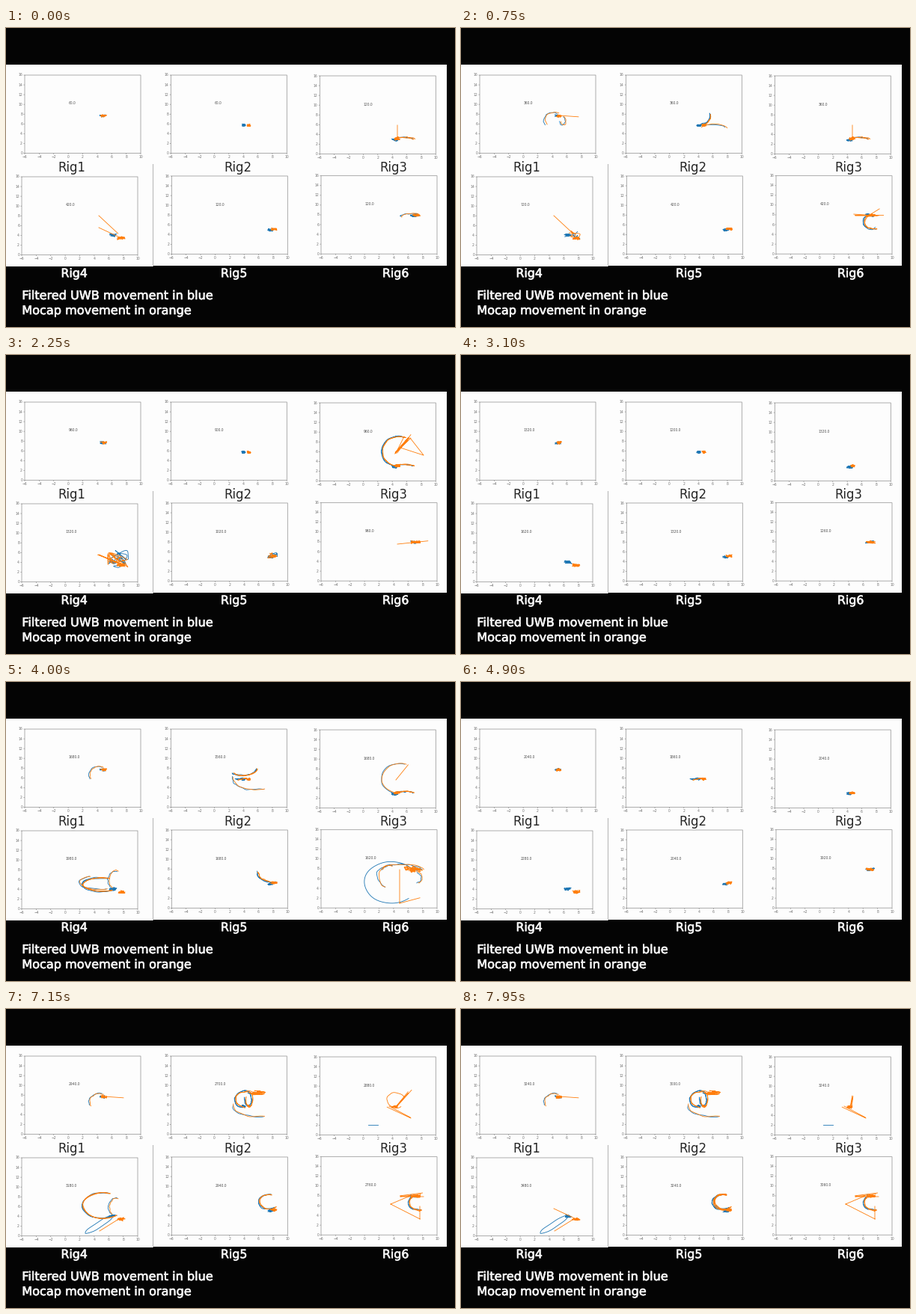
Recreate the animation shown at these times as a matplotlib script. Size 600 px wide and 400 px high, loop 8 s.

```python
import numpy as np
import matplotlib.pyplot as plt
from matplotlib import patheffects
from matplotlib.animation import FuncAnimation
from matplotlib.collections import LineCollection
from matplotlib.patches import Rectangle

W, H, DPI = 600, 400, 100
PX = 72 / DPI
STEP, FRAMES = 50, 160
COLORS = {"b": "#1f77b4", "o": "#ff7f0e"}
BOX_W, BOX_H = 155, 104.5
TICK = 60
rng = np.random.default_rng(7)

# Corner of each plot, clock at the start and clock units per ms
RIGS = [(25, 63, 80, 0.4), (220.3, 63, 90, 0.37), (419.3, 64, 120, 0.394),
        (21, 199, 460, 0.383), (221.3, 198, 140, 0.394), (421, 197.7, 160, 0.3655)]
# Times (ms) at which the rigs are in the middle of an activity
STAGES = [0, 750, 2250, 4000, 5900, 7150, 7950]

trails = [{"b": [], "o": []} for _ in RIGS]
homes = [{"b": [], "o": []} for _ in RIGS]


def life(first, last):
    """Times at which a trail starts to grow and is fully wiped."""
    start, end = -1e6, 1e6
    if first > 0:
        start = STAGES[first] - min(750, 0.65 * (STAGES[first] - STAGES[first - 1])) - 60 * rng.random()
    if last < 6:
        end = STAGES[last] + min(750, 0.65 * (STAGES[last + 1] - STAGES[last])) + 60 * rng.random()
    return start, end


def home(rig, span, x, y, dx=2, dy=0, sx=2.4, sy=1, colors="bo"):
    """Restless walk around the resting place, blue and orange dx, dy apart."""
    for c in colors:
        side = -1 if c == "b" else 1
        p = np.clip(rng.normal(0, 1, (400, 2)), -1.7, 1.7) * (sx, sy)
        homes[rig][c].append((p + (x + side * dx, y + side * dy), life(*span)))


def swing(rig, span, x, y, rx, ry, a0, a1, n=1, tilt=0, colors="bo"):
    """Arc of an ellipse, walked n times with small deviations."""
    u = np.linspace(0, 1, 60)
    a, r = np.radians(a0 + (a1 - a0) * u), np.radians(tilt)
    for c in colors:
        shift = -1.5 if c == "b" and len(colors) > 1 else 0
        for _ in range(n):
            ex, ey = rx * np.cos(a), ry * np.sin(a)
            p = np.column_stack([x + shift + ex * np.cos(r) - ey * np.sin(r),
                                 y + ex * np.sin(r) + ey * np.cos(r)])
            for k in (2, 5, 11):
                wave = np.sin(k * 3 * u[:, None] + rng.uniform(0, 6.3, 2))
                p += wave * rng.normal(0, 1.3 / k**0.5, 2) * 0.6
            trails[rig][c].append((p, life(*span)))


def spike(rig, span, x, y, length, angle, n=1, colors="o"):
    """Straight jumps from a point, fanned out when there are several."""
    u = np.linspace(0, 1, 20)[:, None]
    for c in colors:
        for i in range(n):
            jx, jy, ja, jl = rng.normal(0, 1, 4) * (i > 0)
            a, far = np.radians(angle + 6 * ja), length * (1 + 0.1 * jl)
            p = np.array([x + jx, y + jy]) + u * far * np.array([np.cos(a), np.sin(a)])
            trails[rig][c].append((p, life(*span)))


def scribble(rig, span, x, y, sx, sy, n=9, colors="bo"):
    """Smooth wandering around a point."""
    u = np.linspace(0, n - 1, 8 * n)
    for c in colors:
        knots = np.clip(rng.normal(0, 0.7, (n, 2)), -1, 1) * (sx, sy) + (x, y)
        p = np.column_stack([np.interp(u, np.arange(n), k) for k in knots.T])
        soft = np.array([np.convolve(k, np.ones(5) / 5, "valid") for k in p.T]).T
        trails[rig][c].append((soft, life(*span)))


ALWAYS = (0, 6)

# Rig1: hooks to the left of its home
home(0, ALWAYS, 130, 117.5, 0.5)
for span in ((1, 1), (3, 3), (5, 6)):
    swing(0, span, 124, 124, 12, 11, 150, 300)
for span in ((1, 1), (5, 6)):
    spike(0, span, 131, 117, 26, 4)
swing(0, (1, 1), 137, 124, 3.5, 6, -70, 170)
scribble(0, (4, 4), 134, 113, 11, 9, 16)

# Rig2: low sweep to the right, later a round trip above
home(1, ALWAYS, 321, 130, 3.5, sx=1.6)
swing(1, (1, 1), 322, 117, 12, 12, 90, -10, 2)
swing(1, (1, 1), 338, 134, 18, 5, 200, 350)
for span in ((3, 3), (4, 4), (5, 6)):
    swing(1, span, 335, 130, 31, 14, 190, 70)
swing(1, (3, 3), 318, 116, 18, 9, 140, 0, 2)
scribble(1, (3, 4), 317, 130, 11, 2)
swing(1, (5, 6), 321, 121, 14, 11, 100, 310, 2)
swing(1, (5, 6), 325, 121, 5, 9, -90, 200, 2)
scribble(1, (5, 6), 339, 112, 12, 3, 24, "o")

# Rig3: wide arc to the upper left
home(2, (0, 4), 521, 149, 1.5, -0.7)
home(2, (5, 6), 519, 131, 0, colors="o")
for span in ((0, 1), (2, 2), (3, 3), (4, 4)):
    swing(2, span, 533, 149, 13, 2.5, 180, 340, 2)
spike(2, (0, 1), 523, 148, 18, -90)
for stage, count in ((2, 2), (3, 1)):
    swing(2, (stage, stage), 526, 129, 23, 20, 290, 90, count)
    spike(2, (stage, stage), 521, 131, 26, -51, count**3)
spike(2, (2, 2), 527, 124, 32, 18)
spike(2, (2, 2), 558, 134, 29, 232)
swing(2, (4, 4), 502, 151, 12, 10, 160, 0, colors="b")
spike(2, (4, 4), 522, 132, 14, -82, 3)
spike(2, (4, 4), 507, 130, 18, 3, 2)
scribble(2, (4, 4), 527, 148, 14, 6, 14, "o")
spike(2, (5, 6), 484, 155, 13, 0, colors="b")
spike(2, (5, 6), 512, 130, 32, 28)
spike(2, (5, 6), 541, 146, 35, 205)
swing(2, (5, 5), 521, 122, 12, 10, 60, 330, colors="o")
spike(2, (5, 5), 520, 132, 26, -48, 3)
spike(2, (6, 6), 520, 132, 16, -80, 3)

# Rig4: long loops to the left
home(3, ALWAYS, 148.5, 279, 5.5, 2, 3, 1.3)
spike(3, (0, 1), 124, 251, 35, 43)
for stage, count in ((0, 1), (2, 3), (6, 1)):
    spike(3, (stage, stage), 124, 267, 33, 25, count)
scribble(3, (1, 1), 148, 277, 12, 6)
scribble(3, (2, 2), 150, 272, 14, 13, 20)
swing(3, (3, 3), 129, 271, 26, 9, 290, 60, 2)
swing(3, (3, 3), 126, 268, 27, 9, 240, 70)
for span in ((3, 3), (4, 4), (5, 5)):
    swing(3, span, 147, 265, 9, 12, 290, 120)
spike(3, (4, 4), 117, 278, 34, 3, colors="bo")
swing(3, (5, 5), 130, 263, 27, 17, 290, 50, 2)
swing(3, (5, 6), 125, 288, 22, 4, 0, 360, tilt=-31, colors="b")
spike(3, (5, 6), 125, 297, 30, -32)

# Rig5: mostly resting, then a C-shaped walk
home(4, ALWAYS, 356, 269.5, 2, -0.7)
scribble(4, (2, 2), 356, 268, 7, 4)
swing(4, (3, 3), 358, 254, 21, 14, 180, 80, 2)
scribble(4, (4, 4), 355, 267, 11, 5, 12)
swing(4, (5, 6), 352, 258, 13, 9.5, 285, 50, 2)
swing(4, (6, 6), 351, 258, 14, 10, 285, 50, 2)

# Rig6: band at home, once a very wide loop
home(5, ALWAYS, 547, 250.5, 0.5, sx=3.6)
swing(5, (0, 0), 542, 253, 13, 5, 180, 340)
for span in ((1, 1), (5, 6)):
    swing(5, span, 553, 259, 14, 10, 220, 80, 2)
    spike(5, span, 527, 251, 31, 0, 3)
spike(5, (1, 1), 543, 252, 19, -32)
spike(5, (2, 2), 523, 253, 41, -6)
swing(5, (3, 3), 515, 268, 37, 28, 320, 50, colors="b")
swing(5, (3, 3), 512, 260, 14, 15, 290, 110)
swing(5, (3, 3), 530, 252, 28, 8, 190, 350)
swing(5, (3, 3), 546, 262, 10, 8, -60, 60)
scribble(5, (3, 3), 546, 250, 15, 5, 20, "o")
spike(5, (3, 3), 526, 251, 45, 90)
spike(5, (3, 3), 526, 296, 28, -15)
swing(5, (4, 4), 519, 282, 44, 35, 180, 315, 2, colors="b")
spike(5, (4, 4), 525, 246, 35, 12, 5)
spike(5, (4, 4), 525, 262, 20, -50, 3)
spike(5, (5, 6), 514, 261, 28, -23)
spike(5, (5, 6), 514, 261, 44, 27)
spike(5, (5, 6), 553, 281, 17, -90)


fig = plt.figure(figsize=(W / DPI, H / DPI), dpi=DPI, facecolor="#040404")
ax = fig.add_axes([0, 0, 1, 1])
ax.set_xlim(0, W)
ax.set_ylim(H, 0)
ax.axis("off")


def label(x, y, s, size, color, ha="left", va="center"):
    return ax.text(x, y, s, fontsize=size * PX, color=color, ha=ha, va=va,
                   family="DejaVu Sans", zorder=4)


ax.add_patch(Rectangle((0, 49), 589, 269, fc="#fdfdfd", lw=0))
ax.add_patch(Rectangle((0, 182), 196, 137, fc="#fdfdfd", lw=0))
ax.plot([196, 196], [182, 318], color="#b4b4b4", lw=PX)

rules, curves, counters = [], [], []
for x0, y0, _, _ in RIGS:
    x1, y1 = x0 + BOX_W, y0 + BOX_H
    rules.append([(x0, y0), (x1, y0), (x1, y1), (x0, y1), (x0, y0)])
    for i in range(9):
        tx, ty = x0 + BOX_W * i / 8, y1 - BOX_H * i / 8
        rules += [[(tx, y1), (tx, y1 + 1.5)], [(x0 - 1.5, ty), (x0, ty)]]
        label(tx, y1 + 5, str(2 * i - 6).replace("-", "\u2212"), 4.5, "#707070", "center")
        label(x0 - 3, ty, str(2 * i), 4.5, "#707070", "right")
    counters.append(label(x0 + 58.3, y0 + 38, "", 4.5, "#505050"))
    curves.append({c: ax.plot([], [], color=COLORS[c], lw=0.85 * PX, zorder=z)[0]
                   for c, z in (("b", 2), ("o", 3))})
ax.add_collection(LineCollection(rules, colors="#8c8c8c", linewidths=0.7 * PX, snap=False))

glow = [patheffects.withStroke(linewidth=0.45, foreground="#f4f4f4")]
for n, x in enumerate((87.5, 309.5, 517.5, 91, 304.5, 520.5)):
    if n < 3:
        label(x, 191.5, f"Rig{n + 1}", 16.5, "#262626", "center", "baseline")
    else:
        label(x, 333.2, f"Rig{n + 1}", 15.8, "#f4f4f4", "center", "baseline").set_path_effects(glow)
for y, s in ((363, "Filtered UWB movement in blue"), (383, "Mocap movement in orange")):
    label(21.3, y, s, 16.1, "#f4f4f4", va="baseline").set_path_effects(glow)

GAP = np.full((1, 2), np.nan)


def visible(p, span, t, grow=300):
    """Part of a trail between its wiped tail and its growing head."""
    start, end = span
    hi = np.clip((t - start) / grow, 0, 1)
    lo = np.clip((t - end + grow) / grow, 0, 1)
    return p[int(round(lo * len(p))):int(round(hi * len(p)))]


def update(i):
    for rig, (_, _, start, rate) in enumerate(RIGS):
        tick = int((start + rate * i * STEP) / TICK + 1e-6)
        t = ((tick + 0.5) * TICK - start) / rate
        counters[rig].set_text(f"{tick * TICK}.0")
        for c, curve in curves[rig].items():
            parts = [GAP]
            for p, span in homes[rig][c]:
                parts += [visible(p[6 * tick:6 * tick + 28], span, t), GAP]
            for p, span in trails[rig][c]:
                parts += [visible(p, span, t), GAP]
            xy = np.vstack(parts)
            curve.set_data(xy[:, 0], xy[:, 1])
    return [c for pair in curves for c in pair.values()] + counters


anim = FuncAnimation(fig, update, frames=FRAMES, interval=STEP, repeat=True,
                     repeat_delay=0, blit=False)
plt.show()
```
